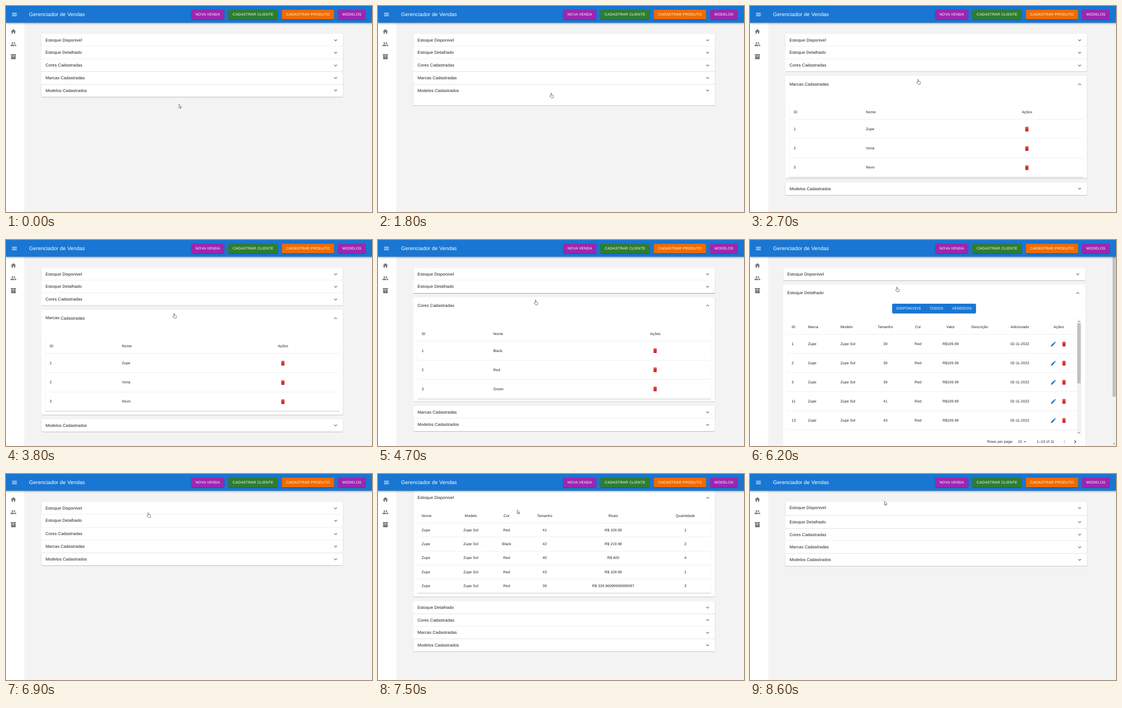
These frames come from a looping animation (690 by 388 pixels, 8700 ms). An HTML page:

```html
<!DOCTYPE html>
<html lang="pt-BR">
<head>
<meta charset="utf-8">
<title>Gerenciador de Vendas</title>
<style>
html, body { margin: 0; width: 100%; height: 100%; overflow: hidden; }
body { background: #f3f3f3; }
/* Laid out at double size so that half pixels survive */
#stage { position: relative; width: 1380px; height: 776px; overflow: hidden; background: #f3f3f3;
  transform: scale(.5); transform-origin: 0 0;
  font: 13.8px "Liberation Sans", Arial, sans-serif; letter-spacing: .0107em; color: #212121; }
#stage div, #stage svg { position: absolute; }
#stage svg { overflow: visible; }
/* The slight turn keeps small glyphs free of hinting */
.text { left: 0; top: 0; line-height: 0; white-space: pre; transform-origin: 0 0; text-rendering: geometricPrecision; }
.mid { width: 320px; text-align: center; }
.title { font-size: 19.76px; letter-spacing: .0075em; color: #fff; }
.head { font-size: 15.8px; letter-spacing: .0094em; }
.caps { letter-spacing: .0286em; color: #fff; }
.bar { background: #1976d2; box-shadow: 0 2px 4px -1px #0003, 0 4px 5px #00000024, 0 1px 10px #0000001f; }
.side { background: #fff; border-right: 1px solid #e0e0e0; box-sizing: border-box; }
.button { border-radius: 4px; box-shadow: 0 3px 1px -2px #0003, 0 2px 2px #00000024, 0 1px 5px #0000001f; }
.panel, .paper { background: #fff; box-shadow: 0 2px 1px -1px #0003, 0 1px 1px #00000024, 0 1px 3px #0000001f; }
.paper { border-radius: 4px; }
.panel:first-child { border-radius: 4px 4px 0 0; }
.panel:last-child { border-radius: 0 0 4px 4px; }
.clip { overflow: hidden; }
.line { background: #e0e0e0; }
.track { background: #f1f1f1; }
.thumb { background: #c1c1c1; }
</style>
</head>
<body>
<div id="stage"></div>
<script>
const LOOP = 8700, STEP = 100;
const LEFT = 66.3, TOP = 52.5, WIDTH = 569.4;
const CLOSED = 23.7, OPEN = 31.6, GAP = 7.9;

const ICONS = {
  menu: "M3 18h18v-2H3zm0-5h18v-2H3zm0-7v2h18V6z",
  home: "M10 20v-6h4v6h5v-8h3L12 3 2 12h3v8z",
  people: "M16 11a3 3 0 1 0 0-6 3 3 0 0 0 0 6zm-8 0a3 3 0 1 0 0-6 3 3 0 0 0 0 6zm0 2c-2.33 0-7 1.17-7 3.5V19h14v-2.5c0-2.33-4.67-3.5-7-3.5zm8 0c-.29 0-.62.02-.97.05 1.16.84 1.97 1.97 1.97 3.45V19h6v-2.5c0-2.33-4.67-3.5-7-3.5z",
  box: "M2 2.5h20v5.2H2zM3.3 9.2h17.4V21.5H3.3zM9 11.8v2h6v-2z",
  more: "M16.59 8.59 12 13.17 7.41 8.59 6 10l6 6 6-6z",
  drop: "M7 10l5 5 5-5z",
  trash: "M6 19c0 1.1.9 2 2 2h8c1.1 0 2-.9 2-2V7H6zM19 4h-3.5l-1-1h-5l-1 1H5v2h14z",
  edit: "M3 17.25V21h3.75L17.81 9.94l-3.75-3.75zM20.71 7.04c.39-.39.39-1.02 0-1.41l-2.34-2.34c-.39-.39-1.02-.39-1.41 0l-1.83 1.83 3.75 3.75z"
};
const CURSORS = {
  arrow: "M0 0V7.2L1.7 5.7 2.8 8.2 3.8 7.7 2.7 5.3H5z",
  hand: "M2.3 5.3V.8a.75.75 0 0 1 1.5 0v2.7l2.6.6q1 .3.9 1.3L6.8 9H2.9L.3 5.9q.2-1.3 2-.6z"
};

const stage = document.getElementById("stage");
const px = v => v * 2 + "px";

function place(el, x, y, w, h) {
  Object.assign(el.style, { left: px(x), top: px(y) });
  if (w !== undefined) Object.assign(el.style, { width: px(w), height: px(h) });
}

function box(parent, cls, x, y, w, h, color) {
  const el = document.createElement("div");
  el.className = cls;
  place(el, x, y, w, h);
  if (color) el.style.background = color;
  parent.append(el);
  return el;
}

function moveText(el, x, y) {
  el.style.transform = `translate(${px(x)}, ${px(y)}) rotate(.02deg)`;
}

function text(parent, str, x, y, cls = "", centered = false) {
  const el = document.createElement("div");
  el.className = `text ${cls} ${centered ? "mid" : ""}`;
  el.textContent = str;
  moveText(el, centered ? x - 80 : x, y);
  parent.append(el);
  return el;
}

function vector(parent, d, x, y, size, view, fill) {
  const ns = "http://www.w3.org/2000/svg";
  const svg = document.createElementNS(ns, "svg"), path = document.createElementNS(ns, "path");
  svg.setAttribute("viewBox", `0 0 ${view} ${view}`);
  place(svg, x, y, size, size);
  path.setAttribute("d", d);
  path.setAttribute("fill", fill);
  svg.append(path);
  parent.append(svg);
  return svg;
}

// Icon centred on x, y
function icon(parent, name, x, y, fill, turn = 0, size = 11.9) {
  const el = vector(parent, ICONS[name], x - size / 2, y - size / 2, size, 24, fill);
  if (turn) el.style.transform = `rotate(${turn}deg)`;
  return el;
}

// Columns are [label, x, centered]
function table(parent, top, headH, rowH, cols, rows, lineW = 554) {
  const first = top + headH;
  cols.forEach(([label, x, mid]) => text(parent, label, x, top + headH / 2, "", mid));
  rows.forEach((row, r) => {
    const y = first + (r + .5) * rowH;
    box(parent, "line", 7.7, first + r * rowH - .5, lineW, .5);
    row.forEach((value, c) => {
      const [, x, mid] = cols[c];
      if (value === "trash") icon(parent, "trash", x, y, "#d32f2f");
      else if (value === "both") {
        icon(parent, "edit", x - 10, y, "#1976d2");
        icon(parent, "trash", x + 10, y, "#d32f2f");
      } else text(parent, value, x, y, "", mid);
    });
  });
}

function simpleTable(names, nameX, actionX) {
  return body => {
    box(body, "paper", 7.7, 55, 554, 136);
    table(body, 55, 27.6, 36.1,
      [["ID", 15.8], ["Nome", nameX], ["Ações", actionX, true]],
      names.map((name, i) => [i + 1, name, "trash"]));
  };
}

function available(body) {
  box(body, "paper", 7.7, 36.5, 554, 158.3);
  const rows = [["Red", 41, "R$ 109.99", 1], ["Black", 42, "R$ 219.98", 2], ["Red", 40, "R$ 400", 4],
    ["Red", 43, "R$ 109.99", 1], ["Red", 39, "R$ 329.96999999999997", 3]];
  table(body, 36.2, 27.6, 26.2,
    [["Nome", 15.8], ["Modelo", 108.6, true], ["Cor", 176, true], ["Tamanho", 247.7, true],
      ["Reais", 377, true], ["Quantidade", 513, true]],
    rows.map(row => ["Zupe", "Zupe Sol", ...row]));
}

function scrollArrow(parent, x, y, turn) {
  icon(parent, "drop", x, y, "#505050", turn, 8);
}

function detailed(body) {
  box(body, "button", 205.5, 36, 158, 17.8, "#1976d2");
  [["DISPONIVEIS", 236.7], ["TODOS", 289], ["VENDIDOS", 337]].forEach(([s, x]) => text(body, s, x, 45, "caps", true));
  [268, 310].forEach(x => box(body, "", x, 36, .5, 17.8, "#1565c0"));
  box(body, "paper", 7.7, 66, 554, 243);
  const rows = [[1, 39], [2, 39], [3, 39], [11, 41], [13, 43]];
  table(body, 66, 27.6, 36.1,
    [["ID", 16], ["Marca", 46.7], ["Modelo", 108], ["Tamanho", 192.7, true], ["Cor", 254.3, true],
      ["Valor", 315.7, true], ["Descrição", 370.7, true], ["Adicionado", 446.2, true], ["Ações", 519.5, true]],
    rows.map(([id, size]) => [id, "Zupe", "Zupe Sol", size, "Red", "R$109.99", "", "02-11-2022", "both"]), 547);
  box(body, "line", 7.7, 273.6, 547, .5);
  box(body, "track", 554, 66, 7.4, 217);
  box(body, "thumb", 554.6, 73, 6.2, 113);
  scrollArrow(body, 557.7, 69.5, 180);
  scrollArrow(body, 557.7, 279, 0);
  text(body, "Rows per page:", 384.6, 295.9);
  text(body, "10", 442.6, 295.9);
  icon(body, "drop", 456, 295.9, "#757575");
  text(body, "1–10 of 11", 478.2, 295.9);
  icon(body, "more", 530.5, 295.9, "#bdbdbd", 90);
  icon(body, "more", 550.5, 295.9, "#212121", -90);
}

const panels = [
  { name: "Estoque Disponivel", full: 202.5, time: 323, open: 7150, close: 8330, fill: available },
  { name: "Estoque Detalhado", full: 317, time: 373, open: 5820, close: 6560, fill: detailed },
  { name: "Cores Cadastradas", full: 198, time: 321, open: 4415, close: 5150, fill: simpleTable(["Black", "Red", "Green"], 150.7, 456.3) },
  { name: "Marcas Cadastradas", full: 198, time: 321, open: 2450, close: 3795, fill: simpleTable(["Zupe", "Vona", "Novo"], 152, 455.7) },
  { name: "Modelos Cadastrados", full: 198, time: 321, open: 560, close: 1597, fill: simpleTable(["Zupe Sol", "Vona", "Novo"], 152, 455.7) }
];

const list = box(stage, "", LEFT, 0, WIDTH, 388);
for (const p of panels) {
  p.el = box(list, "panel", 0, 0, WIDTH, CLOSED);
  p.line = box(p.el, "line", 0, -.5, WIDTH, .5);
  p.label = text(p.el, p.name, 7.9, 12, "head");
  p.arrow = icon(p.el, "more", 555.4, 0, "#616161");
  p.clip = box(p.el, "clip", 0, 0, WIDTH, 0);
  p.fill(box(p.clip, "", 0, -OPEN, WIDTH, p.full));
}

const scrollbar = box(stage, "track", 683, 0, 7, 388);
const thumb = box(scrollbar, "thumb", .7, 7, 5.8, 0);
scrollArrow(scrollbar, 3.5, 384, 0);

const side = box(stage, "side", 0, 0, 35.5, 388);
["home", "people", "box"].forEach((name, i) => icon(side, name, 13.8, 48 + i * 23.8, "#757575"));

const bar = box(stage, "bar", 0, 0, 690, 31.5);
icon(bar, "menu", 16, 16, "#fff");
text(bar, "Gerenciador de Vendas", 43.5, 15.8, "title");
[["NOVA VENDA", 349, 62.7, "#9c27b0"], ["CADASTRAR CLIENTE", 419.2, 93, "#2e7d32"],
  ["CADASTRAR PRODUTO", 520, 98.4, "#ed6c02"], ["MODELOS", 626.2, 52, "#9c27b0"]].forEach(([s, x, w, color]) => {
  box(bar, "button", x, 6.9, w, 17.9, color);
  text(bar, s, x + w / 2, 15.8, "caps", true);
});

const cursors = {};
for (const kind in CURSORS) {
  cursors[kind] = vector(stage, CURSORS[kind], 0, 0, 10, 10, "#fff");
  cursors[kind].firstChild.setAttribute("stroke", "#444");
  cursors[kind].firstChild.setAttribute("stroke-width", ".7");
}

// Pointer stops: time, x, y
const path = [[0, 326, 185], [300, 323.6, 164], [1800, 323.6, 164], [2200, 314, 138.2],
  [3900, 314, 138.2], [4300, 294, 113], [5200, 294, 113], [5600, 274, 88.5],
  [6600, 274, 88.5], [7000, 262.5, 67.5], [7900, 262.5, 67.5], [8100, 253.5, 51.2], [LOOP, 253.5, 51.2]];

// cubic-bezier(.4, 0, .2, 1)
function ease(x) {
  if (x <= 0) return 0;
  if (x >= 1) return 1;
  let lo = 0, hi = 1;
  for (let i = 0; i < 24; i++) {
    const s = (lo + hi) / 2, r = 1 - s;
    if (1.2 * r * r * s + .6 * r * s * s + s ** 3 < x) lo = s; else hi = s;
  }
  return 3 * (1 - lo) * lo * lo + lo ** 3;
}

function openness(p, t, time) {
  return t < p.close ? ease((t - p.open) / time) : 1 - ease((t - p.close) / time);
}

function drawPanels(t) {
  const scroll = 23.3 * openness(panels[0], t, panels[0].time);
  let y = TOP - scroll, before = 0;
  panels.forEach((p, i) => {
    const m = openness(p, t, 150), body = (p.full - OPEN) * openness(p, t, p.time);
    const head = CLOSED + (OPEN - CLOSED) * m;
    if (i) y += GAP * Math.max(m, before);
    place(p.el, 0, y, WIDTH, head + body);
    p.line.style.opacity = i ? (1 - m) * (1 - before) : 0;
    moveText(p.label, 7.9, head / 2 + .2);
    p.arrow.style.top = px(head / 2 - 5.95);
    p.arrow.style.transform = `rotate(${180 * m}deg)`;
    place(p.clip, 0, head, WIDTH, body);
    y += head + body;
    before = m;
  });
  const page = y + scroll + 24, long = page > 388;
  list.style.left = px(LEFT - (long ? 3.8 : 0));
  scrollbar.style.display = long ? "block" : "none";
  thumb.style.height = px(374 * 388 / page);
}

function drawCursor(t) {
  const k = path.findIndex(stop => stop[0] > t);
  const [t0, x0, y0] = path[k - 1], [t1, x1, y1] = path[k];
  const f = (t - t0) / (t1 - t0);
  const x = x0 + (x1 - x0) * f, y = y0 + (y1 - y0) * f;
  const arrow = t < 200 || (t >= 7300 && t < 8000) || t >= 8600;
  cursors.arrow.style.display = arrow ? "block" : "none";
  cursors.hand.style.display = arrow ? "none" : "block";
  cursors[arrow ? "arrow" : "hand"].style.transform = `translate(${px(x)}, ${px(y)})`;
}

const start = performance.now();
function frame() {
  const t = Math.floor((performance.now() - start) % LOOP / STEP) * STEP;
  drawPanels(t);
  drawCursor(t);
  requestAnimationFrame(frame);
}
frame();
</script>
</body>
</html>
```
